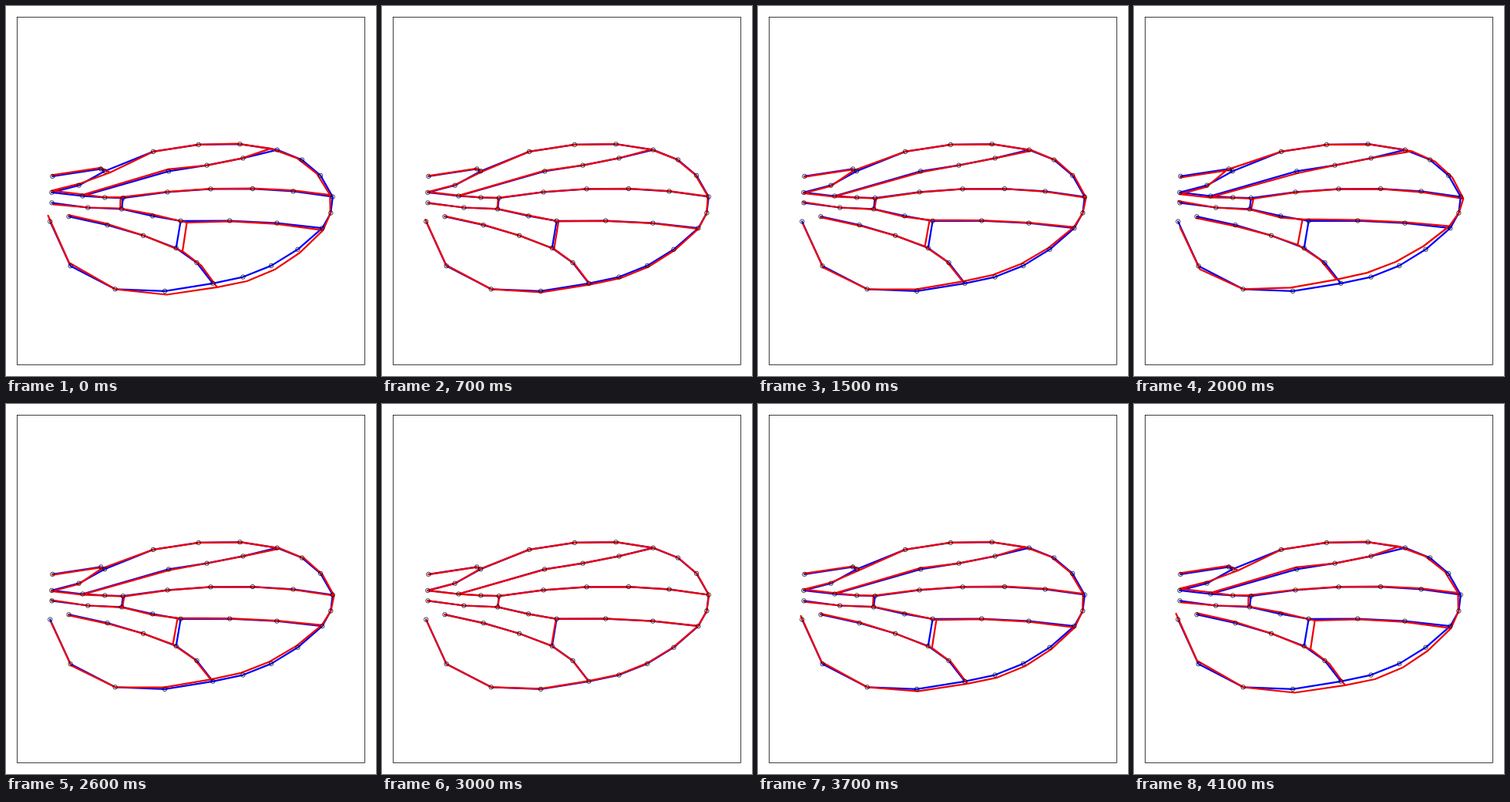
Recreate the animation shown at these times as an HTML page. Size 480x480 px, loop 4200 ms.

```html
<!DOCTYPE html>
<html lang="en">
<head>
<meta charset="utf-8">
<title>Wing shape variation</title>
<style>
html, body { margin: 0; width: 100%; height: 100%; overflow: hidden; background: #fff; }
svg { display: block; width: 100vw; height: 100vh; }
path, circle, rect { fill: none; stroke: #000; stroke-width: .75; }
path { stroke-width: 2.25; stroke-linecap: round; stroke-linejoin: round; }
#mean { stroke: #00f; }
#shape { stroke: #f00000; }
</style>
</head>
<body>
<svg viewBox="0 0 480 480">
  <rect x="14.4" y="14.4" width="451.2" height="451.2"/>
  <path id="mean"/>
  <path id="shape"/>
  <g id="marks"></g>
</svg>
<script>
// A point is [x, y, dx, dy]: its mean place and its shift at the start of the sweep.
const pt = (x, y, dx = 0, dy = 0) => [x, y, dx, dy];

// Evenly spaced points on a quadratic curve; place and shift follow the same rule.
function bend(a, control, b, parts) {
  const inner = Array.from({ length: parts - 1 }, (_, i) => {
    const t = (i + 1) / parts, u = 1 - t;
    return a.map((v, k) => u * u * v + 2 * u * t * control[k] + t * t * b[k]);
  });
  return [a, ...inner, b];
}

// Places where veins meet or turn
const root = pt(59.3, 241.9, 0, -2.2);
const notch = pt(128, 214.2, 7, 1.8);
const shoulder = pt(191, 188.9);
const crest = pt(351.8, 186.6, -8.3, -1.7);
const tip = pt(423.8, 247.5, -3.4, -2.3);
const rear = pt(410.3, 288.2, 1, 2.7);
const heel = pt(268.3, 359.8, 5.6, 5);
const fork = pt(99.4, 246.5, 1.5, -1.9);
const rise = pt(211, 214.4, -.8, -2.6);
const bridgeTop = pt(151.8, 249.1, -3.2, -.9);
const bridgeEnd = pt(150.1, 263.4, -1.8, -.9);
const crossTop = pt(226.6, 278.8, 8, 2.2);
const crossEnd = pt(220.7, 314, 8.3, 4.2);

const veins = [
  // margin, clockwise
  [root, pt(94.6, 232.7, .5, -2), notch, shoulder],
  bend(shoulder, pt(283.3, 169.3, -1, .5), crest, 3),
  bend(crest, pt(406.3, 200.5, -5.5, -2.6), tip, 3),
  bend(tip, pt(425.5, 269.1, .2, 1.4), rear, 2),
  bend(rear, pt(349, 349.8, 5.1, 6.5), heel, 4),
  [heel, pt(206, 369.9, 2.5, 4.6), pt(141.6, 367.3), pt(83.6, 337.2, -1.8, -4.2),
    pt(57.2, 279.6, -2.6, -7.6)],
  // inside, from top to bottom
  [pt(60.3, 220.9, -.3, -1.6), pt(123.1, 211.4, 0, -1.5), notch],
  [root, fork, rise],
  bend(rise, pt(287.3, 204, 5, 2.7), crest, 3),
  [fork, pt(128.2, 248.4, -1.5, -.4), bridgeTop, bridgeEnd],
  bend(bridgeTop, pt(298, 225.1, 3, 1), tip, 5),
  [pt(59.5, 255.3, 2, 2.1), pt(106.2, 261.5), bridgeEnd, pt(190.1, 272.4, -1, -2.3), crossTop],
  bend(crossTop, pt(323.7, 275.8, -6, -.9), rear, 3),
  bend(pt(81.5, 273.2, .3, -1.9), pt(159.5, 287.7, -5, -3), crossEnd, 3),
  [crossTop, crossEnd, pt(247.5, 333, 6, 4), heel]
];

const outline = amount => veins.map(vein => "M" + vein.map(
  ([x, y, dx, dy]) => [x + amount * dx, y + amount * dy]
).join("L")).join("");

const byId = id => document.getElementById(id);
byId("mean").setAttribute("d", outline(0));
byId("marks").innerHTML = [...new Set(veins.flat())]
  .map(([x, y]) => `<circle cx="${x}" cy="${y}" r="2.75"/>`).join("");

// 20 even steps out, one held step, then 20 back.
const stepTime = 100, steps = 20, cycle = 2 * steps + 2;
const start = performance.now();

function draw() {
  const n = Math.floor((performance.now() - start) / stepTime) % cycle;
  const pose = Math.min(n, steps, cycle - 1 - n);
  byId("shape").setAttribute("d", outline(1 - 2 * pose / steps));
  requestAnimationFrame(draw);
}
draw();
</script>
</body>
</html>
```
